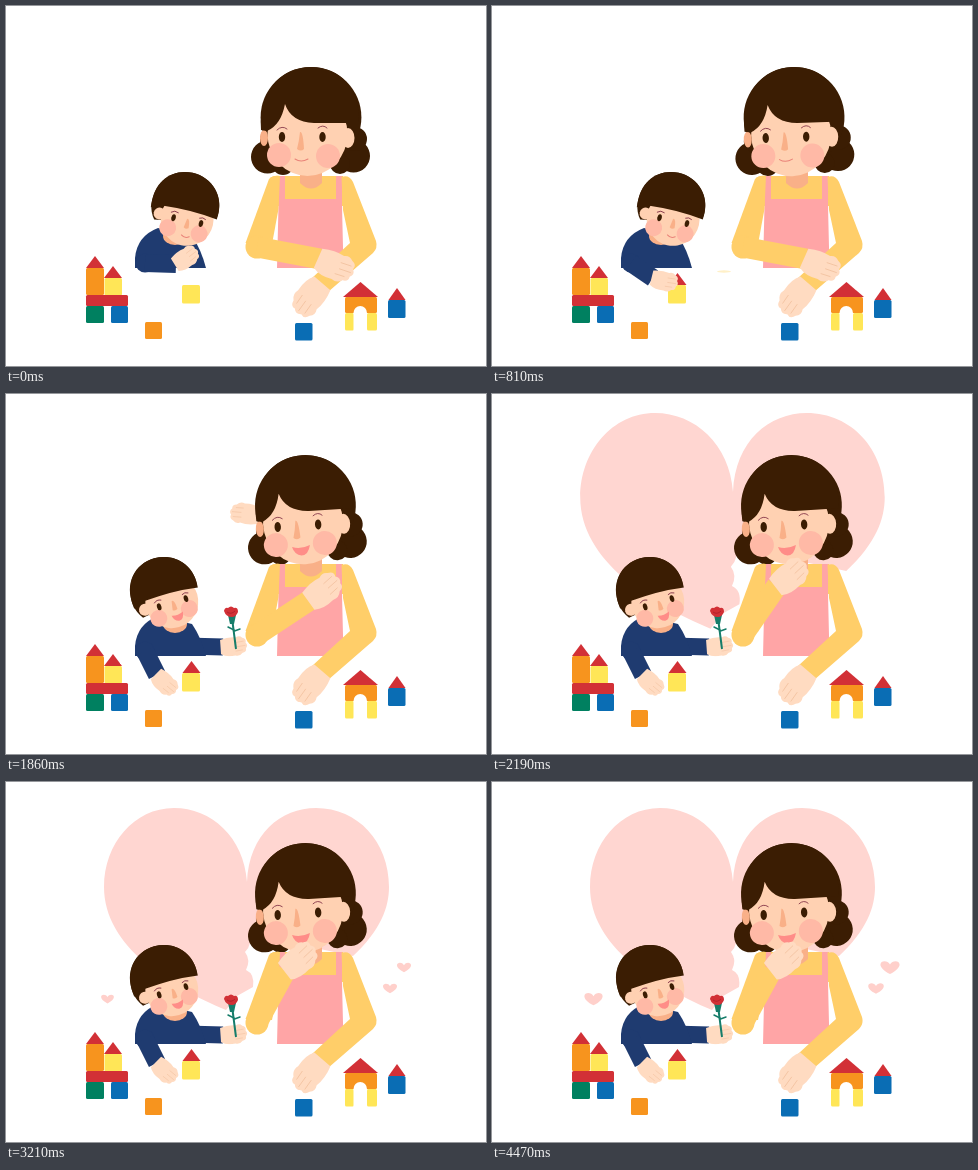
An HTML page that plays this animation: 480x360 px, repeating every 4.5 s.

```html
<!DOCTYPE html>
<html lang="en">
<head>
<meta charset="utf-8">
<title>Playing with blocks</title>
<style>
html, body { margin: 0; width: 100%; height: 100%; overflow: hidden; background: #fff; }
svg { display: block; width: 100vw; height: 100vh; }
.skin { fill: #ffdbc1; }
.face { fill: #ffd1b2; }
.hair { fill: #3b1d03; }
.navy { fill: #1f3b70; }
.yel { fill: #ffce69; }
.pink { fill: #ffa5a6; }
.tan { fill: #f9b088; }
.blush { fill: #ffb9a6; }
.red { fill: #d23036; }
.line { fill: none; stroke: #8a3b4c; stroke-width: .9; stroke-linecap: round; }
.smile { fill: none; stroke: #e98278; stroke-width: 1; stroke-linecap: round; }
.crease { fill: none; stroke: #f3c3a2; stroke-width: .8; stroke-linecap: round; }
.lips { fill: #ff8d88; }
</style>
</head>
<body>
<svg viewBox="0 0 480 360">
  <defs>
    <clipPath id="table"><rect width="480" height="262.5"/></clipPath>
    <path id="love" fill="#ffd0cb" d="M0 5.500 C-5 3 -8 0 -8 -2.500 C-8 -6 -2 -6.500 0 -2.500 C2 -6.500 8 -6 8 -2.500 C8 0 5 3 0 5.500Z"/>
    <g id="hand">
      <path class="skin" d="M-2 -10 Q10 -14 20 -12 Q25 -15 29 -11 Q35 -9 33 -4 Q37 0 33 4 Q34 9 28 10 Q24 15 18 13 Q6 15 -2 10Z"/>
      <path class="crease" d="M20 -5 L30 -6 M21 1 L32 0 M19 7 L28 6"/>
    </g>
  </defs>

  <path id="heart" fill="#ffd6d1" d="M241 100 C238 55 205 26 168 26 C128 26 98 62 98 105 C98 165 165 205 220 228 L231 214 L247 205 Q249 192 240 188 Q245 178 239 170 Q247 162 243 150 L300 164 L347 174 C375 148 383 125 383 105 C383 60 352 26 310 26 C275 26 243 52 241 100Z"/>
  <g id="loves"></g>

  <g id="wave" transform="translate(251 122) rotate(190) scale(.78)"><use href="#hand"/></g>

  <!-- mother, hair behind the body -->
  <g class="hair sway">
    <circle cx="261.5" cy="151" r="16.5"/><circle cx="277" cy="158" r="11"/><circle cx="265" cy="134" r="11"/>
    <circle cx="347.5" cy="150" r="16.5"/><circle cx="334" cy="158" r="10"/><circle cx="349" cy="133" r="12"/>
  </g>
  <path class="yel" d="M264 172 Q268 169 274 170 H337 V200 H272Z"/>
  <path class="pink" d="M273 170 H279 V193 H330 V170 H336 V200 L337.500 262 H271 L272.500 200Z"/>
  <path class="yel" d="M335.500 171 Q343 168 347 176 L370 235 Q372 242 367 247 L322 286 L306 272 L344 237 L337 204Z"/>
  <path class="tan" d="M294 160 H316 V177 Q305 188 294 177Z"/>
  <g transform="translate(315 279) rotate(131) scale(1.06)"><use href="#hand"/></g>
  <path class="yel" d="M263 173 Q267 169 274 170 L272.500 203 L266 238 L239.500 237Z"/>

  <g class="sway">
    <circle class="hair" cx="305" cy="111.300" r="50.400"/>
    <ellipse class="face" cx="342" cy="132" rx="6.500" ry="10"/>
    <ellipse class="face" cx="301.500" cy="128" rx="40" ry="42"/>
    <ellipse class="tan" cx="258" cy="132" rx="4" ry="8"/>
    <path class="hair" d="M255 124 L261 125 Q275 119 279 98 Q285 116 308 117 L352 117 C356 85 335 61 305 61 C274 61 253 86 255 124Z"/>
    <circle class="blush" cx="273" cy="149" r="12"/>
    <circle class="blush" cx="322" cy="150" r="12"/>
    <ellipse class="hair" cx="276" cy="131" rx="3.200" ry="5"/>
    <ellipse class="hair" cx="316.500" cy="131" rx="3.200" ry="5"/>
    <path class="line" d="M271 124 Q276 119 281 123 M312 122 Q317 118 321 122"/>
    <path class="tan" d="M294 126 Q297 125 298 143 Q295 146 291 143 Q293 136 294 126Z"/>
    <path id="momSmile" class="smile" d="M289 153 Q295 157 302 153"/>
    <path id="momLaugh" class="lips" d="M289 152 Q298 155 307 151 Q305 161 298 161 Q291 160 289 152Z"/>
  </g>
  <circle class="yel" cx="251" cy="241" r="11.5"/>
  <path id="momArm" fill="none" stroke="#ffce69" stroke-width="21"/>
  <g id="momHand"><use href="#hand"/></g>

  <!-- blocks -->
  <g id="blocks"></g>
  <ellipse id="sliver" cx="232" cy="265.500" rx="7" ry="1.200" fill="#fff0c8"/>

  <!-- child -->
  <g id="gift" clip-path="url(#table)">
    <path id="sleeve" fill="none" stroke="#1f3b70" stroke-width="17"/>
    <g id="flower">
      <g transform="translate(216 253) rotate(-4) scale(.72)"><use href="#hand"/></g>
      <path fill="none" stroke="#167d6a" stroke-width="2" d="M226 224 L230 255"/>
      <path fill="none" stroke="#167d6a" stroke-width="1.500" stroke-linecap="round" d="M228 236 L222 233 M228.500 237 L234 235"/>
      <path fill="#167d6a" d="M222 221 H230 L228 230 H224Z"/>
      <path class="red" d="M218 217 Q219 213 222 214 Q225 211 228 214 Q232 213 232 218 Q230 223 226 223 Q220 223 218 217Z"/>
      <path fill="none" stroke="#a91f29" stroke-width=".8" d="M221 218 Q225 221 229 217"/>
    </g>
  </g>
  <path class="navy" d="M129 262 V252 Q131 230 152 222 L186 230 Q195 243 200 262Z"/>
  <ellipse class="tan" cx="169" cy="230" rx="12" ry="9"/>
  <g id="kidHead">
    <path class="hair" d="M-33 6 C-36 -18 -20 -34 0 -34 C20 -34 36 -18 34 3 L10 14 L-27 20 Q-32 14 -33 6Z"/>
    <ellipse class="face" cx="5" cy="12.500" rx="26.500" ry="26.500"/>
    <circle class="face" cx="-23" cy="13" r="6"/>
    <path class="hair" d="M-33 9 L-21 4.500 Q8 2 34 6 C37 -18 20 -34 0 -34 C-20 -34 -36 -18 -33 9Z"/>
    <circle class="blush" cx="-12" cy="25" r="8.500"/>
    <circle class="blush" cx="20" cy="24" r="8.500"/>
    <ellipse class="hair" cx="-8.500" cy="14" rx="2.200" ry="3.500"/>
    <ellipse class="hair" cx="19.500" cy="13.500" rx="2.200" ry="3.500"/>
    <path class="line" d="M-12 9 Q-9 6 -5 8 M17 8.500 Q20 6.500 23 8.500"/>
    <path class="tan" d="M5 12 Q8 11 8.500 21 Q6 23 3.500 21Z"/>
    <path id="kidSmile" class="smile" d="M3 29 Q7 32 11 29"/>
    <path id="kidLaugh" class="lips" d="M1 26 Q7 28 13 25 Q12 33 7 33 Q2 32 1 26Z"/>
  </g>
  <path id="roof" class="red" d="M0 0 L9 12 H-9Z"/>
  <circle class="navy" cx="139" cy="257" r="9.5"/>
  <path id="kidArm" fill="none" stroke="#1f3b70" stroke-width="18"/>
  <g id="kidHand"><use href="#hand"/></g>
</svg>
<script>
const $ = id => document.getElementById(id);
const LOOP = 4500;
const red = '#d23036', orange = '#f7941e', yellow = '#ffe657', green = '#008060', blue = '#0a6db4';

const box = (x, y, w, h, c) => `<rect x="${x}" y="${y}" width="${w}" height="${h}" rx="1.5" fill="${c}"/>`;
const tip = (x, y, w, h) => `<path fill="${red}" d="M${x} ${y} l${w / 2} ${h} h${-w}z"/>`;
$('blocks').innerHTML =
  tip(89, 250, 18, 12) + box(80, 262, 18, 27, orange) +
  tip(107, 260, 18, 12) + box(98.5, 272, 17.5, 17.5, yellow) +
  box(80, 289, 42, 11, red) + box(80, 300, 18, 17, green) + box(105, 300, 17, 17, blue) +
  box(139, 316, 17, 17, orange) + box(176, 279, 18, 18.5, yellow) + box(289, 317, 17.5, 17.5, blue) +
  box(339, 291, 32, 16, orange) + box(339, 307, 9, 17.5, yellow) + box(361, 307, 10, 17.5, yellow) +
  '<path fill="#fff" d="M347.500 325 V307 A6.750 7 0 0 1 361 307 V325Z"/>' +
  tip(354.5, 276, 35, 15) + tip(391, 282, 17, 12) + box(382, 294, 17.5, 18, blue);

// x, y, phase in turns
const loves = [[101.5, 217, .605], [398, 185.5, .45], [384, 206.5, .75]].map(([x, y, p]) => {
  const el = document.createElementNS('http://www.w3.org/2000/svg', 'use');
  el.setAttribute('href', '#love');
  $('loves').append(el);
  return { el, x, y, p };
});
const sways = document.querySelectorAll('.sway');

// Eased values between rows of [time, ...values]
function key(t, rows) {
  if (t <= rows[0][0]) return rows[0].slice(1);
  for (let i = 1; i < rows.length; i++) {
    const a = rows[i - 1], b = rows[i];
    if (t < b[0]) {
      const u = (t - a[0]) / (b[0] - a[0]), e = u * u * (3 - 2 * u);
      return a.slice(1).map((v, j) => v + (b[j + 1] - v) * e);
    }
  }
  return rows[rows.length - 1].slice(1);
}
const move = (el, x, y, r = 0, s = 1) =>
  el.setAttribute('transform', `translate(${x} ${y}) rotate(${r}) scale(${s})`);
const show = (id, on) => $(id).setAttribute('visibility', on ? 'visible' : 'hidden');
const limb = (id, x, y, x2, y2) => $(id).setAttribute('d', `M${x} ${y} L${x2} ${y2}`);

function mother(t) {
  const [tilt] = key(t, [[0, 0], [800, -1.9], [1000, -1.9], [1350, -.6], [1750, -3.6]]);
  sways.forEach(el => el.setAttribute('transform', `rotate(${tilt} 305 200)`));
  const [x, y, r] = key(t, [[1400, 314, 253, 24], [1780, 304, 206, -36], [1930, 304, 206, -36], [2300, 280, 188, -38]]);
  limb('momArm', 251, 241, x, y);
  move($('momHand'), x, y, r, 1.04);
  show('momSmile', t < 1650);
  show('momLaugh', t >= 1650);
  show('wave', t >= 1800 && t < 1920);
}

function child(t) {
  const [hx, hy, hr] = key(t, [[1000, 179, 200, 13], [1300, 176, 199, 12], [1400, 176, 199, 12], [1750, 157.5, 197, -16]]);
  move($('kidHead'), hx, hy, hr);
  show('kidSmile', t < 1150);
  show('kidLaugh', t >= 1150);

  const [x, y, r] = key(t, [[200, 170, 258, -32], [700, 161, 272, 14], [920, 161, 272, 14], [1250, 151, 281, 45]]);
  limb('kidArm', 139, 257, x, y);
  move($('kidHand'), x, y, r, .73);

  const [rx, ry] = key(t, [[200, 180, 248], [700, 185.5, 267]]);
  move($('roof'), rx, ry);
  show('roof', t >= 230);
  show('sliver', t >= 750 && t < 900);

  const [dx, dy] = key(t, [[1230, 11, 50], [1350, 11, 40], [1720, 0, 0]]);
  show('gift', t >= 1230);
  limb('sleeve', 180, 252, 217 + dx, 253 + dy);
  move($('flower'), dx, dy);
}

function hearts(t) {
  const [s] = key(t, [[1900, 0], [2140, 1.085], [2320, 1]]);
  $('heart').setAttribute('transform', `translate(241 130) scale(${s}) translate(-241 -130)`);
  const [grow] = key(t, [[2250, 0], [2500, 1]]);
  for (const { el, x, y, p } of loves) {
    const beat = 1 + .2 * Math.sin(2 * Math.PI * (p - (t - 2760) / 530));
    move(el, x, y, 0, beat * grow);
  }
}

function draw(t) {
  mother(t);
  child(t);
  hearts(t);
}

const start = performance.now();
function tick() {
  draw((performance.now() - start) % LOOP);
  requestAnimationFrame(tick);
}
draw(0);
tick();
</script>
</body>
</html>
```
